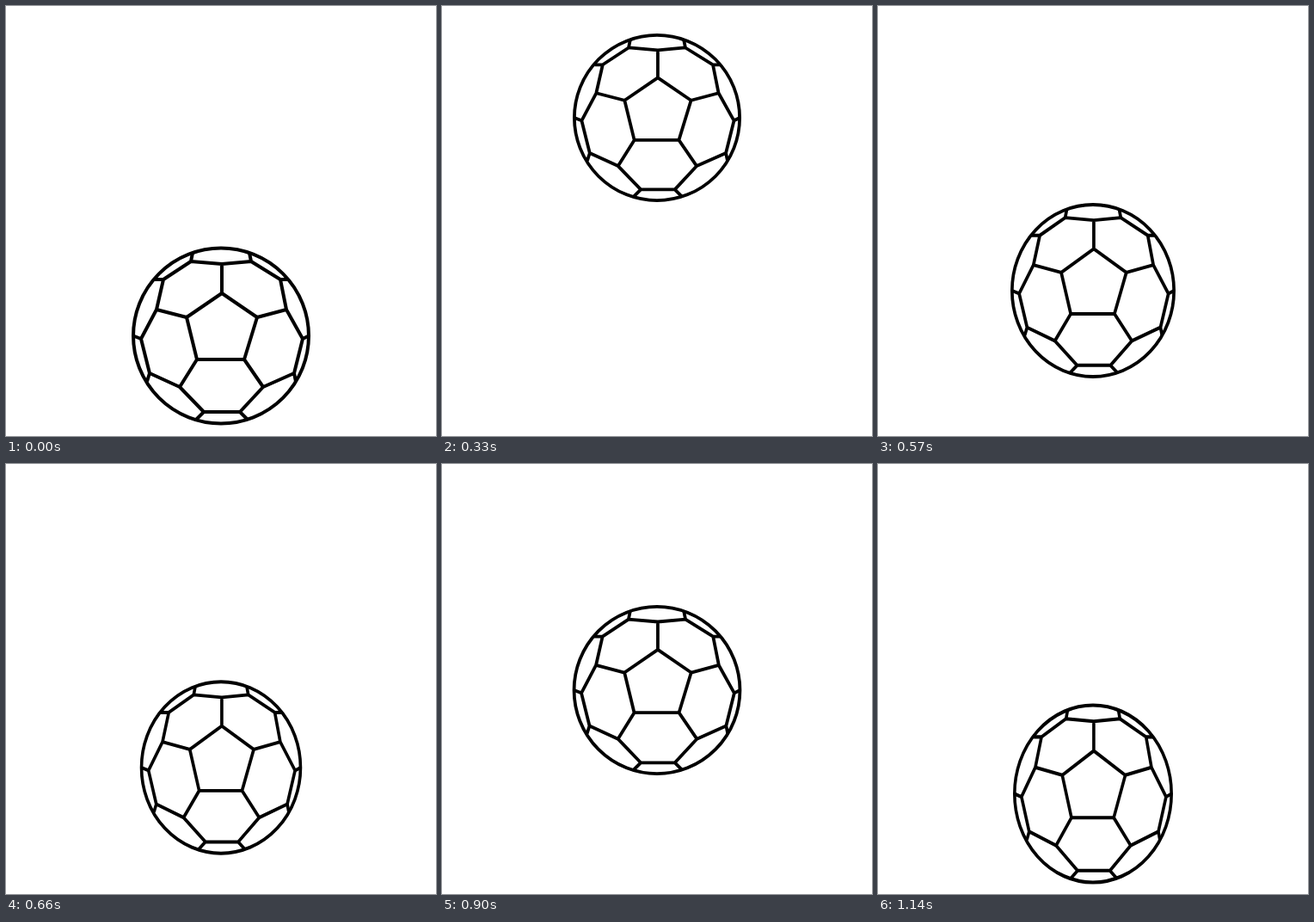
Animation, 500 px wide and 500 px high, one loop 1170 ms. Source, as an HTML page:

```html
<!DOCTYPE html>
<html lang="en">
<head>
<meta charset="utf-8">
<title>Bouncing ball</title>
<style>
  html, body { margin: 0; width: 100%; height: 100%; overflow: hidden; background: #fff; }
  svg { display: block; width: 100%; height: 100%; }
</style>
</head>
<body>
<svg viewBox="0 0 500 500">
  <g id="ball" fill="none" stroke="#000" stroke-width="4" stroke-linejoin="round">
    <circle r="102"/>
    <path d="M1-49.5L42-21.5L27 27.5H-28L-40-21.5Z
      M1-49.5V-83.5
      M-33-96.5L-35-86.5L1-83.5L35-86.5L33-96.5
      M-35-86.5L-67-65.5L-75-30.5L-93 3.5L-83 43.5L-48 59.5L-20 88.5H22L49 59.5L85 43.5L95 3.5L76-30.5L69-65.5L35-86.5
      M-67-65.5H-77 M69-65.5H78
      M-75-30.5L-40-21.5 M76-30.5L42-21.5
      M-93 3.5L-102 0 M95 3.5L102 0
      M-83 43.5L-86 53 M85 43.5L87 53
      M-48 59.5L-28 27.5 M49 59.5L27 27.5
      M-20 88.5L-29 97.5 M22 88.5L31 97.5"/>
  </g>
</svg>
<script>
const LOOP = 1170, STEP = 30, RADIUS = 104;

// Each track is a list of [time, value].
const height = [[0, 383.5], [30, 325], [60, 275], [120, 200.5], [200, 145], [300, 128],
  [330, 130], [450, 190], [570, 331], [600, 374.5], [630, 366], [780, 289.5],
  [870, 260], [1020, 304], [1080, 326], [1110, 351], [1140, 383.5]];
const halfWidth = [[0, 104], [120, 92], [300, 98.5], [330, 98], [570, 96], [600, 95.8],
  [670, 94.2], [780, 96], [870, 98.7], [1020, 94.5], [1140, 93]];
const halfHeight = [[0, 104], [120, 100], [300, 98], [330, 98], [570, 102], [600, 102.5],
  [780, 99], [870, 98.7], [1020, 103], [1140, 105]];

function chord(keys, i) {
  return (keys[i + 1][1] - keys[i][1]) / (keys[i + 1][0] - keys[i][0]);
}

// Monotone tangent: flat at turning points, so nothing overshoots.
function slope(keys, i) {
  const last = keys.length - 1;
  if (i === 0) return chord(keys, 0);
  if (i === last) return chord(keys, last - 1);
  const a = chord(keys, i - 1), b = chord(keys, i);
  return a * b <= 0 ? 0 : 2 * a * b / (a + b);
}

function sample(keys, t) {
  let i = 0;
  while (i < keys.length - 2 && t > keys[i + 1][0]) i++;
  const [t0, v0] = keys[i], [t1, v1] = keys[i + 1];
  const d = t1 - t0, u = (t - t0) / d, w = 1 - u;
  return w * w * (1 + 2 * u) * v0 + u * u * (1 + 2 * w) * v1
    + u * w * d * (w * slope(keys, i) - u * slope(keys, i + 1));
}

const ball = document.getElementById('ball');
const start = performance.now();

function draw(now) {
  const t = Math.floor(Math.max(0, now - start) % LOOP / STEP) * STEP;
  const sx = sample(halfWidth, t) / RADIUS, sy = sample(halfHeight, t) / RADIUS;
  ball.setAttribute('transform', `translate(250 ${sample(height, t)}) scale(${sx} ${sy})`);
  requestAnimationFrame(draw);
}
draw(start);
</script>
</body>
</html>
```
